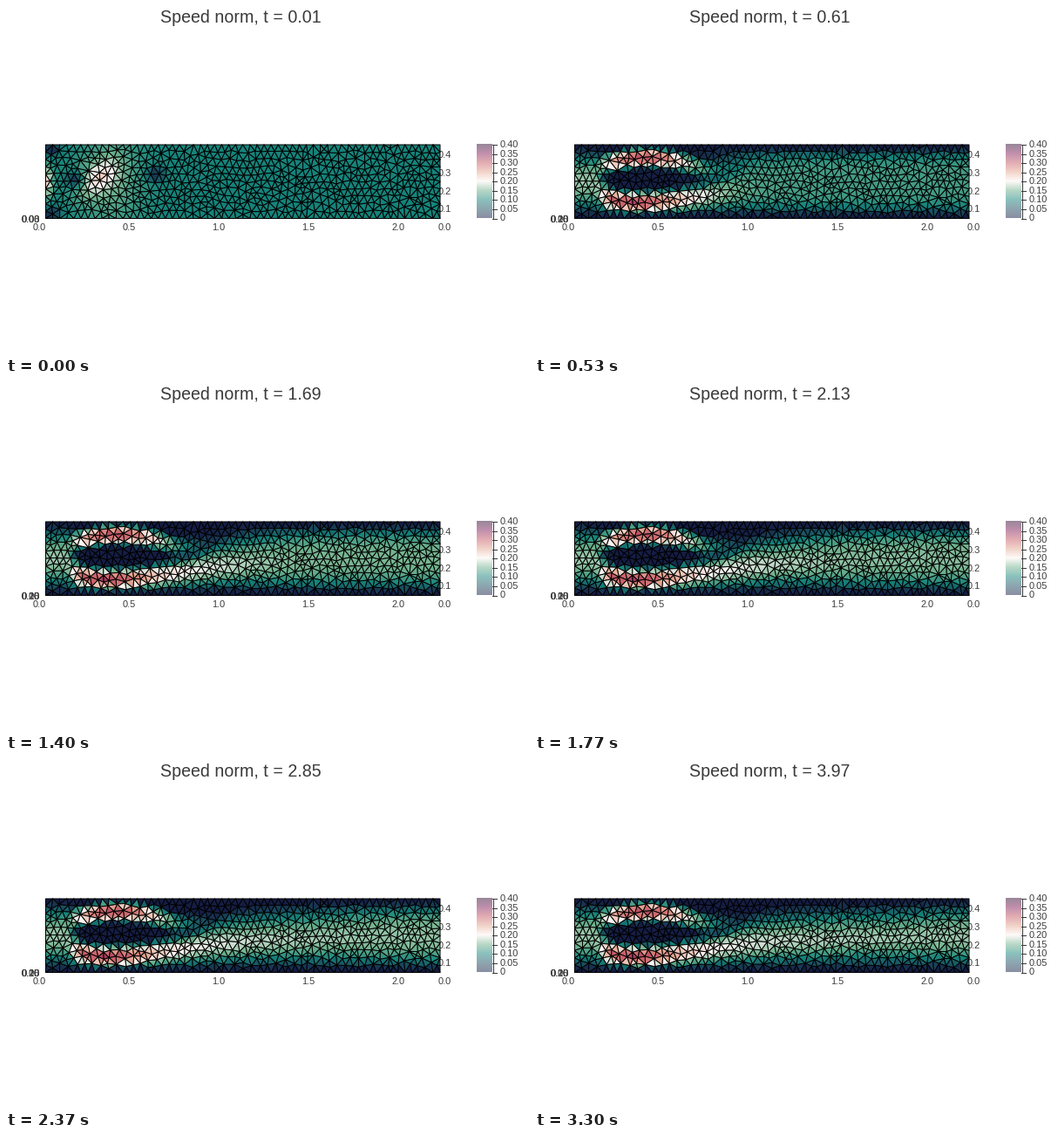
A matplotlib script that plays this animation: 600 px wide and 400 px high, repeating every 3.33 s.

```python
import numpy as np
import matplotlib.pyplot as plt
from matplotlib.animation import FuncAnimation
from matplotlib.collections import PolyCollection
from matplotlib.colors import LinearSegmentedColormap
from matplotlib.tri import Triangulation

W, H, DPI = 600, 400, 100
FRAMES, LOOP_MS = 100, 3330
X0, X1, Y0, Y1 = 45.5, 498, 159, 243.5
MID = (Y0 + Y1) / 2
INK = "#3a3a3a"
PX = 72 / DPI

cmap = LinearSegmentedColormap.from_list("flow", [
    "#151d44", "#1a4e60", "#14837a", "#72b28e", "#fef6f4",
    "#e5a892", "#c65966", "#84205a", "#330d35"])


def build_mesh(cols=56, rows=11, jitter=4.0):
    """Irregular triangles: a jittered staggered grid, relaxed a little."""
    rng = np.random.default_rng(7)
    xs, ys = np.linspace(X0, X1, cols + 1), np.linspace(Y0, Y1, rows)
    step = xs[1] - xs[0]
    edge = [(x, y) for y in (Y0, Y1) for x in xs]
    edge += [(x, y) for x in (X0, X1) for y in ys[1:-1]]
    inner = [(x + step * (0.5 if j % 2 else 1), y)
             for j, y in enumerate(ys[1:-1], 1) for x in xs[:-1 - (j + 1) % 2]]
    inner = np.array(inner) + rng.uniform(-jitter, jitter, (len(inner), 2))
    inner = np.clip(inner, (X0 + 3, Y0 + 4), (X1 - 3, Y1 - 4))
    pts = np.vstack([edge, inner])
    fixed = len(edge)
    for _ in range(2):
        a, b = Triangulation(*pts.T).edges.T
        total, count = np.zeros_like(pts), np.zeros(len(pts))
        for p, q in ((a, b), (b, a)):
            np.add.at(total, p, pts[q])
            np.add.at(count, p, 1)
        mean = total / count[:, None]
        pts[fixed:] += 0.6 * (mean - pts)[fixed:]
    return pts[Triangulation(*pts.T).triangles]


def bump(dx, dy, sx, sy):
    return np.exp(-(dx / sx) ** 2 - (dy / sy) ** 2)


def sigmoid(d, width):
    return 1 / (1 + np.exp(-d / width))


def ridge(y, centre, amp, above, below, power=1.8):
    d = y - centre
    d = np.abs(d / np.where(d < 0, above, below))
    return amp * np.clip(1 - d ** power, 0, None)


def start_field(x, y):
    """Even flow with a tilted fast patch, a warm inlet and slow spots."""
    dx, dy = x - 107, y - 196
    v = 0.10 + 0.045 * bump(x - 120, y - MID, 36, 50)
    v += 0.085 * bump(dx + 0.5 * dy, dy, 19, 21)
    v += 0.13 * bump(x - X0, y - MID, 7, 17)
    for sx, sy in ((79, 199), (172, 193), (52, Y0 + 5), (52, Y1 - 5)):
        v -= 0.09 * bump(x - sx, y - sy, 10, 8)
    return v


def jets_field(x, y):
    """Settled flow: inlet profile, two jets around a wake, then one stream."""
    inlet = ridge(y, MID, 0.165, 39, 39, 2)
    rise = 1 - np.exp(-(x - 65).clip(0) / 14)
    past = (x - 115).clip(0)

    low_y = MID + 25 * rise / (1 + (past / 105) ** 2)
    low_amp = 0.163 + 0.165 * rise / (1 + (past / 55) ** 2)
    above = 16 + 25 * sigmoid(x - 232, 13)
    low = ridge(y, low_y, low_amp, above, (Y1 - 3.5 - low_y).clip(13), 1.6)

    up_y = 173.5 + 14 * (((x - 128) / 68) ** 2).clip(0, 1)
    up_amp = 0.315 * bump(x - 125, 0, 75, 1)
    up = ridge(y, up_y, up_amp, 13, 14)

    mix = sigmoid(x - 76, 3)
    return inlet * (1 - mix) + np.maximum(low, up) * mix


def speed(x, y, t):
    age = t - 0.01
    power = 2.1 + 1.9 / (0.25 + age)
    plug = ridge(y, MID, 0.165 - 0.07 * np.exp(-age), 39, 39, power)
    far = sigmoid(x - 175 - 72 * t, 14 + 6 * t)
    settled = jets_field(x, y) * (1 - far) + plug * far
    old = np.exp(-age / 0.12)
    return np.clip(start_field(x, y) * old + settled * (1 - old), 0, 0.4)


fig = plt.figure(figsize=(W / DPI, H / DPI), dpi=DPI, facecolor="white")
ax = fig.add_axes([0, 0, 1, 1])
ax.set_axis_off()


def label(x, y, s, size=11, ha="center"):
    return ax.text(x, y, s, fontsize=size * PX, family="Liberation Sans",
                   color=INK, ha=ha, va="baseline", zorder=1)


title = label(269.3, 19, "", 19.6)
for i in range(5):
    label(38.5 + 102.8 * i, 257, f"{0.5 * i:.1f}")
    label(503.5, 257 - 20.7 * i, f"{0.1 * i:.1f}")

# The height ticks are seen end-on, so their labels pile up.
early = [label(28, 248, f"{0.03 * i:.2f}") for i in range(3)]
later = [label(28, 248, f"{0.05 * i:.2f}") for i in (0, 2, 4, 5)]

# Colour bar
ax.imshow(np.linspace(1, 0, 168)[:, None], cmap=cmap, alpha=0.5,
          extent=(540, 558, Y1, Y0), aspect="auto", zorder=1)
ax.plot([558.5, 558.5], [Y0, Y1], color=INK, lw=PX)
for i in range(9):
    y = Y1 - (Y1 - Y0) * i / 8
    ax.plot([558, 563], [y, y], color=INK, lw=PX)
    label(566.5, y + 3, f"{0.05 * i:.2f}" if i else "0", ha="left")

cells = build_mesh()
cx, cy = cells.mean(axis=1).T
mesh = PolyCollection(cells, edgecolors="black", linewidths=PX,
                      cmap=cmap, zorder=3)
mesh.set_clim(0, 0.4)
ax.add_collection(mesh)
ax.set_xlim(0, W)
ax.set_ylim(H, 0)


def draw(i):
    t = 0.01 + 0.04 * i
    title.set_text(f"Speed norm, t = {t:.2f}")
    mesh.set_array(speed(cx, cy, t))
    for s in early:
        s.set_visible(i == 0)
    for s in later:
        s.set_visible(i > 0)
    return [mesh, title, *early, *later]


anim = FuncAnimation(fig, draw, frames=FRAMES, interval=LOOP_MS / FRAMES,
                     repeat=True, repeat_delay=0, blit=False)
plt.show()
```
